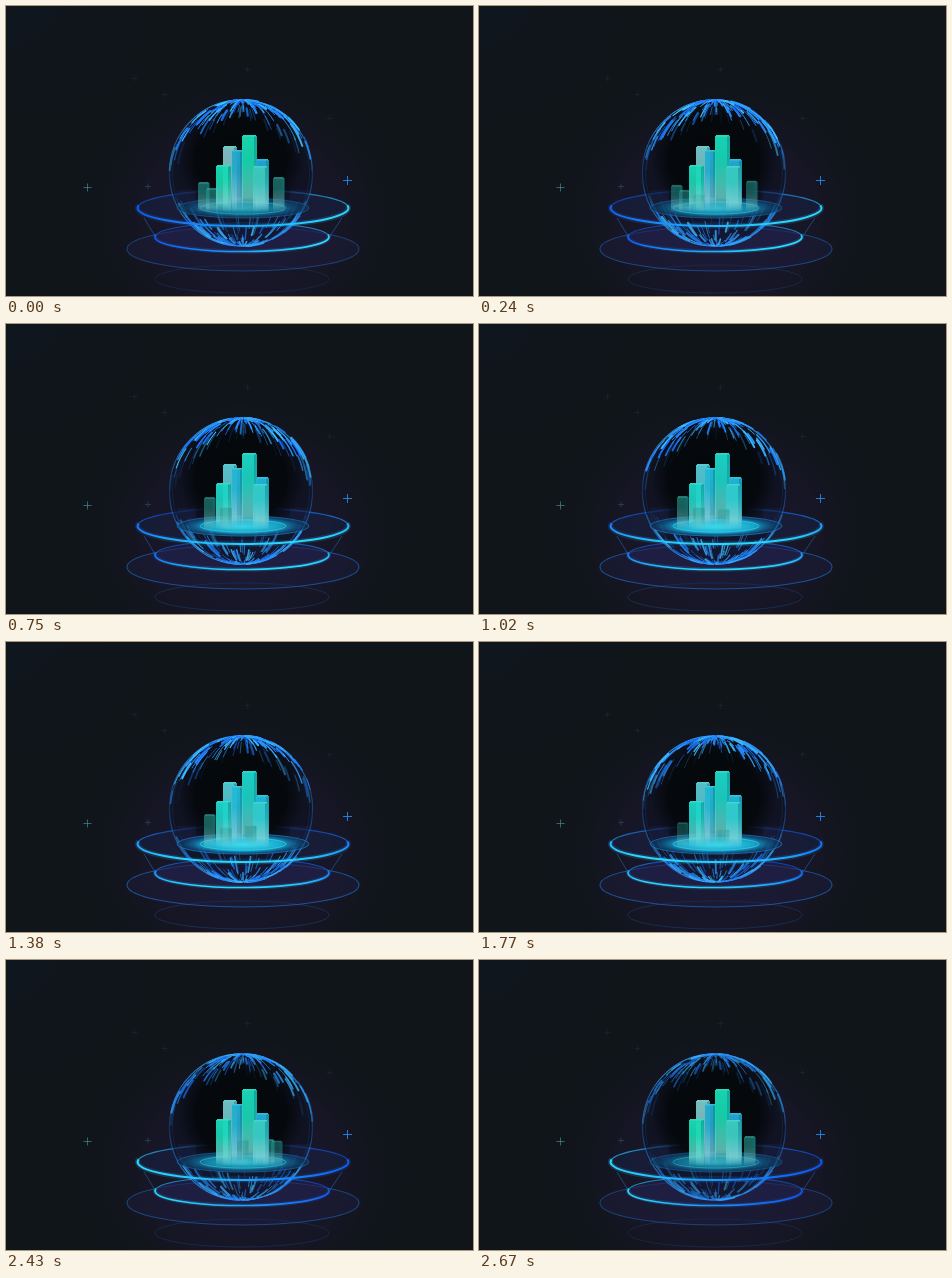
Write an HTML page with a canvas that moves like this. It is 467x290 px and loops after 2.7 s.

```html
<!DOCTYPE html>
<html lang="en">
<head>
<meta charset="utf-8">
<title>Data sphere</title>
<style>
  html, body { margin: 0; width: 100%; height: 100%; overflow: hidden; background: #10151a; }
  canvas { display: block; width: 467px; height: 290px; }
</style>
</head>
<body>
<canvas id="stage" width="467" height="290"></canvas>
<script>
const ctx = document.getElementById('stage').getContext('2d');
const W = 467, H = 290, LOOP = 2700, STEP = 30, TAU = Math.PI * 2;
const SPHERE = { x: 235, y: 167, rx: 71.5, ry: 73 };
const GREEN = [24, 218, 178], CYAN = [34, 204, 224], BLUE = [14, 92, 250], AQUA = [42, 216, 255];

const lerp = (a, b, k) => a + (b - a) * k;
const mix = (a, b, k) => a.map((v, i) => Math.round(lerp(v, b[i], k)));
const rgba = (c, a = 1) => `rgba(${c[0]},${c[1]},${c[2]},${a})`;

function seeded(seed) {
  return () => {
    seed = (seed * 1664525 + 1013904223) >>> 0;
    return seed / 4294967296;
  };
}

// Dashes that run along the meridians of the sphere
const rnd = seeded(41);
const makeStreaks = n => Array.from({ length: n }, (_, i) => ({
  phi: ((i + rnd()) / n - 0.5) * Math.PI,
  phase: rnd(),
  speed: rnd() < 0.7 ? 1 : 2,
  len: 0.16 + rnd() * 0.26,
  width: 0.7 + rnd() ** 2 * 1.6,
  tone: rnd()
}));
const topStreaks = makeStreaks(130);
const lowStreaks = makeStreaks(110);

const towers = [
  { x: 217, top: 140, w: 14, tint: [128, 194, 196] },
  { x: 226, top: 144, w: 11, tint: [36, 168, 206] },
  { x: 236, top: 129, w: 15, tint: GREEN },
  { x: 250, top: 153, w: 13, tint: [36, 166, 214] },
  { x: 210, top: 159, w: 15, tint: GREEN },
  { x: 247, top: 160, w: 15, tint: [60, 200, 186] }
];

// Each small bar rises, peaks at a share of the loop and sinks again
const smallBars = [
  { x: 192, top: 176, peak: 0, life: 0.14 },
  { x: 200, top: 182, peak: 0, life: 0.14 },
  { x: 267, top: 171, peak: 0, life: 0.14 },
  { x: 198, top: 172, peak: 0.42, life: 0.3 },
  { x: 257, top: 179, peak: 0.85, life: 0.14 },
  { x: 265, top: 176, peak: 1, life: 0.14 },
  { x: 214, top: 183, peak: 0.32, life: 0.28, front: true },
  { x: 231, top: 177, peak: 0.8, life: 0.16, front: true },
  { x: 239, top: 183, peak: 0.5, life: 0.2, front: true }
];

function ellipse(x, y, rx, ry, from = 0, to = TAU) {
  ctx.beginPath();
  ctx.ellipse(x, y, rx, ry, 0, from, to);
}

function disc(x, y, rx, ry, color) {
  ellipse(x, y, rx, ry);
  ctx.fillStyle = color;
  ctx.fill();
}

function stroke(color, width = 1) {
  ctx.strokeStyle = color;
  ctx.lineWidth = width;
  ctx.stroke();
}

function outline(x, y, rx, ry, color, width) {
  ellipse(x, y, rx, ry);
  stroke(color, width);
}

function line(x1, y1, x2, y2, color) {
  ctx.beginPath();
  ctx.moveTo(x1, y1);
  ctx.lineTo(x2, y2);
  stroke(color);
}

function plus(x, y, r, color) {
  line(x - r, y, x + r, y, color);
  line(x, y - r, x, y + r, color);
}

function glow(x, y, rx, ry, stops) {
  ctx.save();
  ctx.translate(x, y);
  ctx.scale(1, ry / rx);
  const g = ctx.createRadialGradient(0, 0, 0, 0, 0, rx);
  stops.forEach(([k, c]) => g.addColorStop(k, c));
  ctx.fillStyle = g;
  ctx.fillRect(-rx, -rx, rx * 2, rx * 2);
  ctx.restore();
}

// Gradient whose bright side lies at the ellipse angle `lead`
function ringLight(x, y, rx, ry, lead, alpha) {
  const gx = Math.cos(lead) / rx, gy = Math.sin(lead) / ry, n = gx * gx + gy * gy;
  const g = ctx.createLinearGradient(x - gx / n, y - gy / n, x + gx / n, y + gy / n);
  g.addColorStop(0, rgba(BLUE, alpha * 0.9));
  g.addColorStop(0.4, rgba(mix(BLUE, AQUA, 0.3), alpha));
  g.addColorStop(1, rgba(AQUA, alpha));
  return g;
}

function litRing(x, y, rx, ry, lead, front, width) {
  const light = alpha => ringLight(x, y, rx, ry, lead, alpha);
  if (front) {
    ellipse(x, y, rx, ry, -0.15, Math.PI + 0.15);
    stroke(light(0.16), width * 2.6);
    stroke(light(1), width);
  } else {
    ellipse(x, y, rx, ry, Math.PI, TAU);
    stroke(light(0.65), width * 0.65);
  }
}

function background() {
  ctx.fillStyle = '#10151a';
  ctx.fillRect(0, 0, W, H);
  glow(0, 0, 150, 120, [[0, 'rgba(16,24,36,.4)'], [1, 'rgba(16,24,36,0)']]);
  glow(238, 210, 165, 145, [[0, 'rgba(30,26,54,.9)'], [0.6, 'rgba(24,22,40,.8)'], [1, 'rgba(18,20,29,0)']]);
  plus(81.5, 181.5, 4, 'rgba(64,138,152,.7)');
  plus(142, 180.5, 3, 'rgba(50,85,110,.55)');
  plus(341.5, 174.5, 4.5, 'rgba(34,130,225,.95)');
  [[128, 72], [241, 63], [158, 88], [323, 112]].forEach(([x, y]) => plus(x + 0.5, y + 0.5, 3, 'rgba(50,70,85,.22)'));
}

function base(lead, pulse) {
  outline(236, 273, 87, 14, rgba([32, 76, 130], 0.3 + 0.15 * pulse));
  disc(237, 243, 116, 22, 'rgba(30,32,66,.4)');
  outline(237, 243, 116, 22, rgba([30, 92, 172], 0.6 + 0.25 * pulse), 1.1);
  disc(236, 231, 87, 14.5, 'rgba(34,34,80,.55)');
  litRing(236, 231, 87, 14.5, lead, false, 1.6);
  litRing(236, 231, 87, 14.5, lead, true, 1.6);
  line(138, 212, 149, 230, 'rgba(36,100,170,.6)');
  line(336, 212, 324, 230, 'rgba(36,100,170,.6)');
  disc(237, 202, 105.5, 18, 'rgba(24,34,68,.55)');
  litRing(237, 202, 105.5, 18, lead, false, 2);
}

function spherePoint(phi, theta, up) {
  return [
    SPHERE.x + SPHERE.rx * Math.sin(theta) * Math.sin(phi) + 2 * Math.cos(theta),
    SPHERE.y - up * SPHERE.ry * Math.cos(theta)
  ];
}

function streaks(list, time, up, alpha, near, far) {
  ctx.lineCap = 'round';
  list.forEach(s => {
    const p = (s.phase + time * s.speed) % 1;
    const reach = lerp(near, far, Math.sin(s.phi) ** 2);
    const head = 0.08 + p * reach;
    const tail = Math.max(0.05, head - s.len * (0.6 + p * 0.4));
    ctx.beginPath();
    for (let i = 0; i <= 4; i++) ctx.lineTo(...spherePoint(s.phi, lerp(tail, head, i / 4), up));
    stroke(rgba(mix([20, 98, 240], [64, 198, 255], s.tone), alpha * Math.min(1, (1 - p) * 4)), s.width);
  });
  ctx.lineCap = 'butt';
}

function shell(time, power) {
  const { x, y, rx, ry } = SPHERE;
  disc(x, y, rx, ry, 'rgba(10,17,30,.5)');
  glow(x, 154, 64, 60, [[0, '#05080b'], [0.72, 'rgba(5,8,11,.95)'], [1, 'rgba(6,10,16,0)']]);
  const edge = ctx.createLinearGradient(0, y - ry, 0, y + ry);
  edge.addColorStop(0, 'rgba(52,170,255,.95)');
  edge.addColorStop(0.5, 'rgba(28,92,180,.4)');
  edge.addColorStop(1, 'rgba(50,165,250,.9)');
  outline(x, y, rx, ry, edge, 1.2);
  outline(x, y, rx - 3, ry - 1, 'rgba(28,92,176,.25)', 0.8);
  streaks(topStreaks, time, 1, power, 0.72, 1.6);
  streaks(lowStreaks, time, -1, power * 0.8, 1, 1.25);
}

function platform(pulse) {
  disc(237, 202, 66, 10, 'rgba(13,56,92,.6)');
  outline(237, 202, 66, 10, rgba([32, 130, 205], 0.4 + 0.3 * pulse));
  ctx.fillStyle = 'rgba(42,62,118,.14)';
  ctx.fillRect(284, 184, 19, 15);
  ctx.fillRect(171, 184, 19, 15);
  glow(237, 202, 64, 11, [
    [0, rgba([40, 215, 232], 0.6 + 0.4 * pulse)],
    [0.6, rgba([22, 178, 216], 0.42 + 0.5 * pulse)],
    [1, 'rgba(18,110,190,0)']
  ]);
  outline(237, 202, 43, 6, rgba([48, 205, 222], 0.45 + 0.4 * pulse));
}

function bar(x, top, w, color, alpha, bottom = 206) {
  const pale = mix(color, [152, 212, 218], 0.65);
  const g = ctx.createLinearGradient(0, top, 0, bottom);
  g.addColorStop(0, rgba(color, alpha));
  g.addColorStop(0.35, rgba(color, alpha * 0.95));
  g.addColorStop(0.8, rgba(pale, alpha * 0.85));
  g.addColorStop(1, rgba(pale, 0));
  ctx.fillStyle = g;
  ctx.fillRect(x, top + 1, w, bottom - top - 1);
  const shade = ctx.createLinearGradient(0, top, 0, bottom);
  shade.addColorStop(0, rgba([10, 120, 134], alpha * 0.5));
  shade.addColorStop(1, rgba([10, 120, 134], 0));
  ctx.fillStyle = shade;
  ctx.fillRect(x + w - 3, top + 1, 3, bottom - top - 1);
  ctx.fillStyle = rgba(mix(color, [90, 240, 235], 0.35), alpha);
  ctx.fillRect(x + 1, top, w - 2, 1.5);
}

function drawSmall(time, front) {
  smallBars.filter(b => !!b.front === front).forEach(b => {
    const d = Math.abs(time - b.peak) / b.life;
    if (d >= 1) return;
    const k = 1 - d ** 4;
    bar(b.x, lerp(194, b.top, k), 11.5, [36, 146, 138], k * (front ? 0.4 : 0.66));
  });
}

function draw(t) {
  const time = t / LOOP;
  const pulse = Math.sin(time * Math.PI);
  const lead = lerp(0.3, 3.1, time);

  background();
  base(lead, pulse);
  shell(time, 1 - 0.4 * time ** 5);
  platform(pulse);
  drawSmall(time, false);
  towers.forEach(b => bar(b.x, b.top, b.w, mix(b.tint, CYAN, pulse * 0.5), 0.97));
  drawSmall(time, true);
  glow(237, 203, 46, 8, [[0, rgba([60, 220, 240], 0.25 + 0.45 * pulse)], [1, 'rgba(40,190,230,0)']]);
  litRing(237, 202, 105.5, 18, lead, true, 2);
}

const start = performance.now();
function frame() {
  const t = (performance.now() - start) % LOOP;
  draw(Math.floor(t / STEP) * STEP);
  requestAnimationFrame(frame);
}
frame();
</script>
</body>
</html>
```
